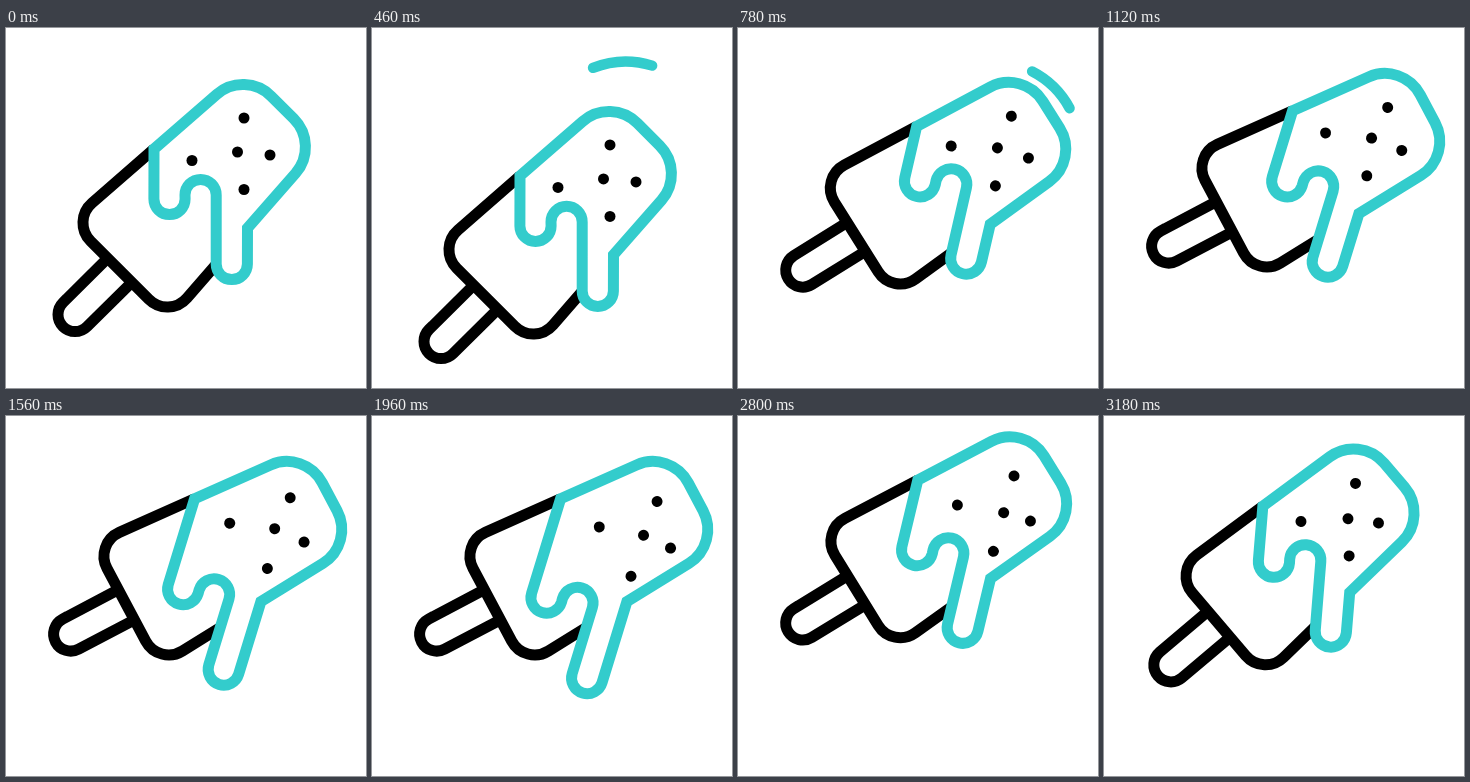
These frames come from a looping animation (360 by 360 pixels, 3200 ms). An HTML page with a canvas:

```html
<!DOCTYPE html>
<html lang="en">
<head>
<meta charset="utf-8">
<title>Melting ice pop</title>
<style>
  html, body { margin: 0; width: 100%; height: 100%; overflow: hidden; background: #fff; }
  canvas { display: block; width: 360px; height: 360px; }
</style>
</head>
<body>
<canvas id="stage"></canvas>
<script>
const LOOP = 3200, STEP = 20, SIZE = 360;
const INK = '#000', ICE = '#33cccc', WIDTH = 11;
const RAD = Math.PI / 180;
const PIVOT = { x: 180, y: 255 };

const canvas = document.getElementById('stage');
const ctx = canvas.getContext('2d');
const ratio = window.devicePixelRatio || 1;
canvas.width = canvas.height = SIZE * ratio;

// x, y, how far each chip slides while the ice melts, delay
const chips = [
  [238, 90, 5.1, 8.9, 0],
  [186, 132.5, 12, 6.8, 0],
  [231.5, 124, 12.3, 14.4, 80],
  [264, 127, 5.9, 14.9, 0],
  [238, 161.5, 0, 21.5, 0]
];

const ramp = (t, a, b) => Math.min(1, Math.max(0, (t - a) / (b - a)));
const ease = (t, a, b) => (1 - Math.cos(Math.PI * ramp(t, a, b))) / 2;
const slide = t => ramp(t, 1320, 2380) - ramp(t, 2380, 3270);
const melt = t => 53 * (ramp(t, 720, 1840) - ramp(t, 1840, 3305));

function pose(t) {
  const crouch = ease(t, 215, 530);
  const jump = ease(t, 628, 854);
  const float = ease(t, 2380, 2930);
  const fall = ease(t, 2930, 3430);
  return {
    y: 30.5 * crouch - 65.2 * jump - 21.2 * float + 54.4 * fall,
    tilt: 17 * (jump - ease(t, 2460, 3565))
  };
}

function stroke(color, width = WIDTH, cap = 'butt') {
  ctx.strokeStyle = color;
  ctx.lineWidth = width;
  ctx.lineCap = cap;
  ctx.lineJoin = 'miter';
  ctx.stroke();
}

function drawStick() {
  ctx.beginPath();
  ctx.moveTo(101.7, 230.2);
  ctx.lineTo(57, 274.6);
  ctx.arc(69, 286.6, 17, -135 * RAD, 45 * RAD, true);
  ctx.lineTo(125.8, 254.3);
  stroke(INK);
}

function drawBody() {
  ctx.beginPath();
  ctx.moveTo(148, 121);
  ctx.arcTo(64.9, 193.4, 162.6, 291.1, 26);
  ctx.arcTo(162.6, 291.1, 314.1, 117.1, 26);
  ctx.lineTo(210, 236.7);
  stroke(INK);
}

function drawIcing(drip) {
  const r = 15.6;
  ctx.beginPath();
  ctx.moveTo(148, 121);
  ctx.arcTo(238.9, 41.9, 314.1, 117.1, 40);
  ctx.arcTo(314.1, 117.1, 241.5, 200.5, 40);
  ctx.lineTo(241.5, 200);
  ctx.arc(225.8, 236 + drip, r, 0, Math.PI);
  ctx.arc(194.6, 167 + drip, r, 0, Math.PI, true);
  ctx.arc(163.5, 171 + drip, r, 0, Math.PI);
  ctx.closePath();
  stroke(ICE);
}

function drawChips(t) {
  ctx.fillStyle = INK;
  for (const [x, y, dx, dy, delay] of chips) {
    const s = slide(t - delay);
    ctx.beginPath();
    ctx.arc(x + dx * s, y + dy * s, 5.5, 0, 2 * Math.PI);
    ctx.fill();
  }
}

// Swoosh that runs clockwise ahead of the jump
function drawSwoosh(t) {
  const from = -111.7, span = 83.5;
  const head = ease(t, 340, 590), tail = ease(t, 643, 890);
  if (head <= 0 || tail >= 1) return;
  ctx.beginPath();
  ctx.arc(253.7, 122, 88.4, (from + span * tail) * RAD, (from + span * head) * RAD);
  stroke(ICE, 10.4, 'round');
}

function draw(t) {
  const p = pose(t);
  ctx.setTransform(ratio, 0, 0, ratio, 0, 0);
  ctx.fillStyle = '#fff';
  ctx.fillRect(0, 0, SIZE, SIZE);
  drawSwoosh(t);
  ctx.translate(PIVOT.x, PIVOT.y + p.y);
  ctx.rotate(p.tilt * RAD);
  ctx.translate(-PIVOT.x, -PIVOT.y);
  drawStick();
  drawBody();
  drawIcing(melt(t));
  drawChips(t);
}

function tick() {
  const t = Math.floor((performance.now() % LOOP) / STEP) * STEP;
  draw(t < 220 ? 0 : t);
  requestAnimationFrame(tick);
}
tick();
</script>
</body>
</html>
```
